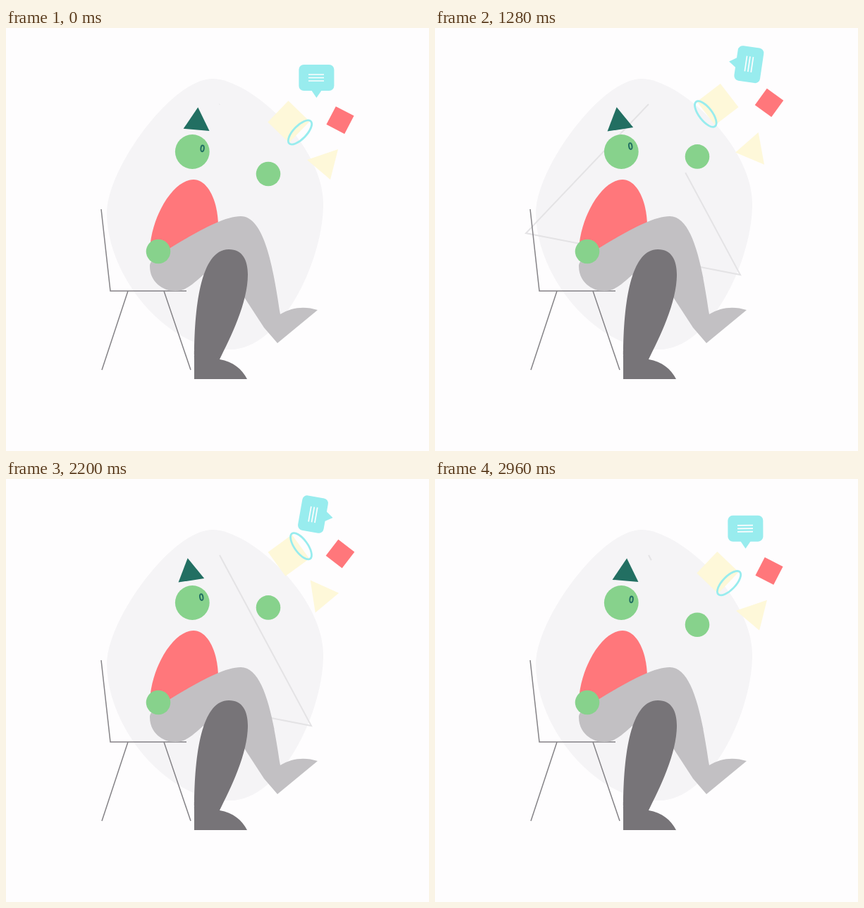
Animation, 600 px wide and 600 px high, one loop 3 s. Source, as an HTML page:

```html
<!DOCTYPE html>
<html lang="en">
<head>
<meta charset="utf-8">
<title>Seated thinker</title>
<style>
html, body { margin: 0; width: 100%; height: 100%; overflow: hidden; background: #fefdfe; }
svg { display: block; width: 100vw; height: 100vh; }
.red { fill: #ff777b; }
.green { fill: #87d28c; }
.teal { fill: #226f62; }
.cream { fill: #fef8d9; }
.aqua { fill: #98ecee; }
.line { fill: none; }
</style>
</head>
<body>
<svg viewBox="0 0 600 600">
  <path fill="#f5f4f6" d="M293 72C345 72 450 165 450 250C450 330 390 456 318 456C225 456 143 350 143 262C143 200 235 72 293 72Z"/>
  <path id="trace" class="line" stroke="#e4e3e5" stroke-width="2" pathLength="1" d="M303 108L129 291L433 350L303 108"/>

  <path class="line" stroke="#858387" stroke-width="1.5" d="M135 257L148 373H256M173 373L136 485M224 373L262 485"/>
  <path class="red" d="M204 313C207 265 238 215 266 215C286 215 301 245 301 282L230 320Z"/>
  <path fill="#c2c0c3" d="M204 338C204 329 215 323 233 312C268 291 308 267 333 267C366 267 379 338 389 406C405 396 424 394 442 400L385 447L366 425L338 382L280 350C268 360 257 373 240 373C222 373 204 360 204 338Z"/>
  <path fill="#777478" d="M267 498V470C267 400 275 314 316 314C336 314 343 330 343 350C343 390 318 440 303 470C322 473 335 484 342 498Z"/>
  <circle class="green" cx="216" cy="317" r="17.3"/>

  <circle class="green" cx="264.3" cy="175.5" r="24.4"/>
  <g id="face">
    <path class="teal" d="M267 112L249 144H286Z"/>
    <ellipse class="line" stroke="#226f62" stroke-width="2" cx="278.2" cy="169.6" rx="2.2" ry="4.4"/>
  </g>

  <g id="lift">
    <circle class="green" cx="372" cy="207" r="17.3"/>
    <g data-pivot="401 133">
      <rect class="cream" x="380" y="112" width="42" height="42" transform="rotate(44 401 133)"/>
      <ellipse class="line" stroke="#98ecee" stroke-width="2.8" cx="417" cy="148" rx="22" ry="9.3" transform="rotate(-46 417 148)"/>
    </g>
    <g data-pivot="474 130.7">
      <rect class="red" x="459.5" y="116.2" width="29" height="29" transform="rotate(27.5 474 130.7)"/>
    </g>
    <g data-pivot="449 193.5">
      <path class="cream" d="M427 187L471 172L460 215Z"/>
    </g>
    <g data-pivot="440.4 75.5">
      <rect class="aqua" x="415.4" y="52" width="50" height="37" rx="7"/>
      <path class="aqua" d="M433 88H448L440.4 99Z"/>
      <path stroke="#fefdfe" stroke-width="1.7" d="M429 66H451M429 70.5H451M429 75H451"/>
    </g>
  </g>
</svg>
<script>
const LOOP = 3000;
const $ = id => document.getElementById(id);
const spinners = document.querySelectorAll('[data-pivot]');
const traceKeys = [[0, 0], [520, .4], [920, .6225], [1460, .99], [1500, 1]];

const ease = (t, from, to) => {
  const x = Math.min(1, Math.max(0, (t - from) / (to - from)));
  return x * x * (3 - 2 * x);
};

function traced(t) {
  if (t <= 0) return 0;
  const i = traceKeys.findIndex(key => key[0] >= t);
  if (i < 0) return 1;
  const [t0, v0] = traceKeys[i - 1], [t1, v1] = traceKeys[i];
  return v0 + (v1 - v0) * (t - t0) / (t1 - t0);
}

function draw(now) {
  const t = now % LOOP;

  // The outline is drawn in the first half and erased in the second.
  const start = traced(t - LOOP / 2), end = traced(t);
  $('trace').style.strokeDasharray = `0 ${start} ${end - start} 2`;

  const up = ease(t, 160, 1000) - ease(t, 2350, 3000);
  $('lift').setAttribute('transform', `translate(0 ${-24.6 * up})`);
  $('face').setAttribute('transform', `rotate(${4.8 - 13.3 * up} 264 175)`);

  const angle = 360 * ease(t, 380, 3000);
  for (const part of spinners)
    part.setAttribute('transform', `rotate(${angle} ${part.dataset.pivot})`);
}

const begin = performance.now();
function tick() {
  draw(performance.now() - begin);
  requestAnimationFrame(tick);
}
tick();
</script>
</body>
</html>
```
